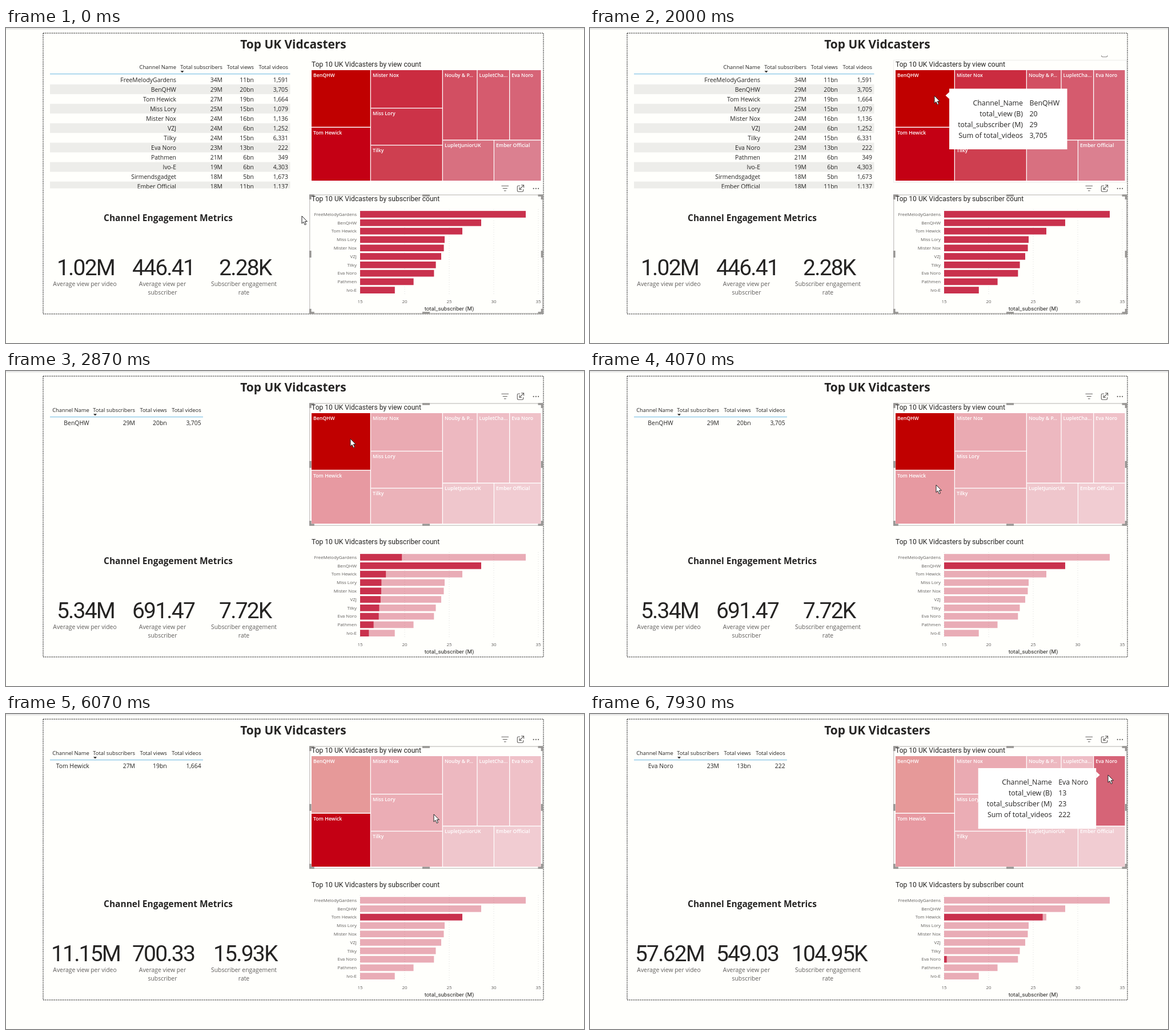
These frames come from a looping animation (1012 px wide and 553 px high, 8 s). An HTML page:

```html
<!DOCTYPE html>
<html lang="en">
<head>
<meta charset="utf-8">
<title>Channel dashboard</title>
<style>
html, body { margin: 0; width: 100%; height: 100%; overflow: hidden; background: #fffffc; }
svg { display: block; width: 100vw; height: 100vh; }
text { font-family: "Open Sans", "Noto Sans", sans-serif; fill: #252423; }
.din { font-family: Roboto, sans-serif; }
.r { text-anchor: end; }
.c { text-anchor: middle; }
.bold { font-weight: 700; }
.gray { fill: #605e5c; }
.cell { font-size: 10.4px; }
.head { font-size: 9.35px; }
.small { font-size: 7.95px; }
.tile { font-size: 8.7px; font-weight: 600; fill: #fff; }
.title { font-size: 12.1px; }
.card { font-size: 39px; letter-spacing: -1.8px; }
.tip { font-size: 12.35px; }
</style>
</head>
<body>
<svg id="stage" viewBox="0 0 1012 553" xmlns="http://www.w3.org/2000/svg">
<defs>
<linearGradient id="shade" x2="0" y2="1"><stop stop-color="#dedede"/><stop offset="1" stop-color="#fffffc"/></linearGradient>
<clipPath id="tableClip"><rect x="70" y="50" width="432" height="231.5"/></clipPath>
</defs>
</svg>
<script>
const LOOP = 8000;
const NS = "http://www.w3.org/2000/svg";
const stage = document.getElementById("stage");

function add(parent, tag, attrs) {
  const node = document.createElementNS(NS, tag);
  for (const k in attrs) node.setAttribute(k, attrs[k]);
  parent.appendChild(node);
  return node;
}
const group = (parent, attrs) => add(parent, "g", attrs);
const box = (parent, x, y, width, height, fill) => add(parent, "rect", { x, y, width, height, fill });
const stroke = (parent, d, color, width) =>
  add(parent, "path", { d, fill: "none", stroke: color, "stroke-width": width });
function label(parent, x, y, str, cls) {
  const node = add(parent, "text", { x, y, class: cls });
  node.textContent = str;
  return node;
}
const show = (node, on) => node.setAttribute("visibility", on ? "visible" : "hidden");
const clamp = v => Math.max(0, Math.min(1, v));
const cubic = p => p < .5 ? 4 * p ** 3 : 1 - 4 * (1 - p) ** 3;
const smooth = p => p * p * (3 - 2 * p);

const channels = [
  ["FreeMelodyGardens", "34M", "11bn", "1,591"],
  ["BenQHW", "29M", "20bn", "3,705"],
  ["Tom Hewick", "27M", "19bn", "1,664"],
  ["Miss Lory", "25M", "15bn", "1,079"],
  ["Mister Nox", "24M", "16bn", "1,136"],
  ["VZJ", "24M", "6bn", "1,252"],
  ["Tilky", "24M", "15bn", "6,331"],
  ["Eva Noro", "23M", "13bn", "222"],
  ["Pathmen", "21M", "6bn", "349"],
  ["Ivo-E", "19M", "6bn", "4,303"],
  ["Sirmendsgadget", "18M", "5bn", "1,673"],
  ["Ember Official", "18M", "11bn", "1,137"]
];
const barEnds = [910, 832, 799, 768, 766.5, 762, 752.5, 749.3, 713.5, 680.7];
const tiles = [
  ["BenQHW", 535, 74, 102.7, 99.5, "#c00000"],
  ["Tom Hewick", 535, 175, 102.7, 93, "#c40014"],
  ["Mister Nox", 639, 74, 124.7, 66, "#cb2c40"],
  ["Miss Lory", 639, 141.3, 124.7, 63.7, "#cc3348"],
  ["Tilky", 639, 206.3, 124.7, 61.7, "#ce3f50"],
  ["Nouby & P...", 765, 74, 59.3, 122, "#d24f62"],
  ["LupletCha...", 825.6, 74, 55.4, 122, "#d55b6e"],
  ["Eva Noro", 882.3, 74, 54.2, 122, "#d66477"],
  ["LupletJuniorUK", 765, 197.4, 88.8, 70.6, "#d87080"],
  ["Ember Official", 855, 197.4, 81.5, 70.6, "#db8090"]
];

// Each selection: channel row, tile, and the times at which the parts respond.
const picks = [
  { row: 1, tile: 0, map: 2415, bars: 2570, cards: 2730, table: 2800, values: ["5.34M", "691.47", "7.72K"] },
  { row: 2, tile: 1, map: 4850, bars: 5011, cards: 5130, table: 5260, values: ["11.15M", "700.33", "15.93K"] },
  { row: 7, tile: 7, map: 7720, bars: 7827, cards: 7870, table: 7870, values: ["57.62M", "549.03", "104.95K"] }
];
const lastPick = (t, part) => picks.filter(p => t >= p[part]).pop();

// Blend from state to state; pick null means nothing is selected.
function blend(t, part, span, ease, value) {
  let v = value(null);
  for (const p of picks) v += (value(p) - v) * ease(clamp((t - p[part]) / span));
  return v;
}

box(stage, 0, 0, 1012, 553, "#fffffc");
box(stage, 0, 0, 1012, 4, "url(#shade)");
add(stage, "rect", { x: 65, y: 9, width: 876, height: 493, fill: "none", stroke: "#3a3a3a", "stroke-width": 1.5, "stroke-dasharray": "1.6 1.6" });
label(stage, 503, 36, "Top UK Vidcasters", "bold c").style.fontSize = "20.9px";
label(stage, 284, 339, "Channel Engagement Metrics", "bold c").style.fontSize = "15.5px";

// Table
const heads = ["Channel Name", "Total subscribers", "Total views", "Total videos"];
function tableFrame(cols, end, arrowX) {
  const g = group(stage, { "clip-path": "url(#tableClip)" });
  heads.forEach((h, i) => label(g, cols[i], 72, h, "head r"));
  add(g, "path", { d: `M${arrowX - 3} 75.3h6l-3 3.2z`, fill: "#252423" });
  return g;
}
const blueLine = (g, end) => stroke(g, `M77 80.6H${end}`, "#84c4e6", 1.2);
const wide = [298, 379, 434, 494], tight = [145.7, 226, 281.7, 341.7];
const fullTable = tableFrame(wide, 497, 308.5);
channels.forEach((row, i) => {
  const y = 82 + 17.05 * i;
  if (i % 2) box(fullTable, 77, y, 420.5, 17.05, "#ededea");
  row.forEach((s, k) => label(fullTable, wide[k], y + 12.6, s, "cell r"));
});
blueLine(fullTable, 497.5);
add(fullTable, "rect", { x: 506.3, y: 60.5, width: 5, height: 24.5, rx: 1.5, fill: "#b3b1ae" });
const oneTable = tableFrame(tight, 345, 156);
blueLine(oneTable, 345);
const oneRow = tight.map(x => label(oneTable, x, 94.6, "", "cell r"));

// Cards
const cards = [139.5, 275.5, 418.8].map(x => label(stage, x, 433.5, "", "din card c"));
[[138, "Average view per video"], [274, "Average view per", "subscriber"], [416.5, "Subscriber engagement", "rate"]]
  .forEach(([x, ...lines]) => lines.forEach((s, i) => {
    label(stage, x, 453.3 + 15 * i, s, "gray c").style.fontSize = "10.4px";
  }));

// Bar chart
for (let i = 0; i < 5; i++) {
  const x = 620 + 78 * i;
  add(stage, "path", { d: `M${x} 318V470`, stroke: "#dcdcda", "stroke-dasharray": "1 3" });
  label(stage, x, 482.5, 15 + 5 * i, "small gray c");
}
label(stage, 776, 496, "total_subscriber (M)", "din c").style.fontSize = "9.7px";
const bars = barEnds.map((end, i) => {
  const y = 321.2 + 14.8 * i;
  label(stage, 614, y + 8.5, channels[i][0], "small gray r");
  box(stage, 620, y, end - 620, 11.6, "#c9314d").setAttribute("opacity", .4);
  return box(stage, 620, y, end - 620, 11.6, "#c9314d");
});

// Treemap
const hover = group(stage);
add(hover, "rect", { x: 531.5, y: 56.5, width: 408, height: 214.5, fill: "none", stroke: "#ececea" });
stroke(hover, "M895.5 48.3q0 2.4 2.2 2.4h6q2.2 0 2.2-2.4", "#8a8886", 1.1);
box(stage, 534, 73, 403.5, 196, "#fff");
const tileRects = tiles.map(([, x, y, w, h, fill]) => box(stage, x, y, w, h, fill));
tiles.forEach(([name, x, y]) => label(stage, x + 3, y + 12, name, "tile"));

// Selection frame with handles and header icons
function frame(top, bottom, iconY) {
  const g = group(stage), l = 531.8, r = 939.5, mid = (top + bottom) / 2;
  add(g, "rect", { x: l, y: top, width: r - l, height: bottom - top, fill: "none", stroke: "#b4b2b0" });
  const a = l + 1, b = r - 1, c = top + 1, d = bottom - 1;
  stroke(g, `M${a} ${c + 7}V${c}H${a + 7}M${b - 7} ${c}H${b}V${c + 7}M${b} ${d - 7}V${d}H${b - 7}M${a + 7} ${d}H${a}V${d - 7}` +
    `M729 ${c}h13M729 ${d}h13M${a} ${mid - 6}v12M${b} ${mid - 6}v12`, "#989694", 3.6);
  const i = group(g, { transform: `translate(0 ${iconY})` });
  stroke(i, "M867.5 -4.3h12.5M869.7 0h8M872 4.3h3.6", "#605e5c", 1.1);
  stroke(i, "M900 -4.5h-3q-1.7 0-1.7 1.7v6.8q0 1.7 1.7 1.7h7q1.7 0 1.7-1.7v-2.5M902 -5.7h4.6v4.6M906.3 -5.4L900 1M899 -2v4h4", "#605e5c", 1.1);
  for (let k = 0; k < 3; k++) add(i, "circle", { cx: 923.7 + 4.2 * k, cy: .3, r: 1.15, fill: "#605e5c" });
  return g;
}
const barFrame = frame(293, 501, 281.5);
const mapFrame = frame(57, 271, 44.5);
label(stage, 535, 68, "Top 10 UK Vidcasters by view count", "din title");
label(stage, 535, 304, "Top 10 UK Vidcasters by subscriber count", "din title");

// Tooltips
const tipNames = ["Channel_Name", "total_view (B)", "total_subscriber (M)", "Sum of total_videos"];
function tooltip(x, y, w, row, from, to, flip) {
  const node = group(stage, { transform: `translate(${x} ${y})` });
  box(node, 0, 0, w, 106.5, "#fff");
  add(node, "path", { d: flip ? `M${w} 6l6.5 6-6.5 6z` : "M0 6l-6.5 6 6.5 6z", fill: "#fff" });
  const [name, subs, views, videos] = channels[row];
  [name, parseInt(views), parseInt(subs), videos].forEach((v, i) => {
    label(node, 129, 29.3 + 19 * i, tipNames[i], "tip r");
    label(node, 140.5, 29.3 + 19 * i, v, "tip");
  });
  return { node, from, to };
}
const tips = [
  tooltip(629, 106.5, 206.5, 1, 1900, 2850),
  tooltip(633, 187, 225, 2, 4430, 5480),
  tooltip(679.7, 95, 206.5, 7, 7760, LOOP, true)
];

// Pointer: start, end, curve control point, goal
const moves = [
  [70, 870, 560, 470, 600, 400],
  [930, 1270, 610, 220, 579, 93],
  [1400, 1730, 590, 108, 603, 119],
  [3670, 4040, 732, 165, 606, 200],
  [5400, 6050, 680, 215, 749, 176],
  [6130, 6930, 800, 170, 865, 122],
  [7000, 7400, 890, 112, 907, 107]
];
const pointer = add(stage, "path", {
  d: "M0 0V13.2L3 10.5L5.2 15.6L7.5 14.6L5.3 9.7H9.4Z",
  fill: "#fff", stroke: "#222", "stroke-width": 1, "stroke-linejoin": "round"
});
function pointerAt(t) {
  let x = 518, y = 330;
  for (const [a, b, cx, cy, gx, gy] of moves) {
    if (t < a) break;
    const p = smooth(clamp((t - a) / (b - a))), q = 1 - p;
    x = q * q * x + 2 * q * p * cx + p * p * gx;
    y = q * q * y + 2 * q * p * cy + p * p * gy;
  }
  return [x, y];
}

function draw(t) {
  const rowPick = lastPick(t, "table"), cardPick = lastPick(t, "cards");
  show(fullTable, !rowPick);
  show(oneTable, rowPick);
  if (rowPick) oneRow.forEach((n, i) => n.textContent = channels[rowPick.row][i]);
  const values = cardPick ? cardPick.values : ["1.02M", "446.41", "2.28K"];
  cards.forEach((n, i) => n.textContent = values[i]);

  tileRects.forEach((n, i) =>
    n.setAttribute("opacity", blend(t, "map", 200, p => p, p => !p || p.tile === i ? 1 : .4)));
  bars.forEach((n, i) =>
    n.setAttribute("width", (barEnds[i] - 620) * blend(t, "bars", 500, cubic, p => +(!p || p.row === i))));

  show(hover, t >= 930 && t < 2270);
  show(barFrame, t < 2270);
  show(mapFrame, t >= 2270);
  tips.forEach(({ node, from, to }) => show(node, t >= from && t < to));
  pointer.setAttribute("transform", `translate(${pointerAt(t)})`);
}

const begin = performance.now();
function tick() {
  draw((performance.now() - begin) % LOOP);
  requestAnimationFrame(tick);
}
draw(0);
requestAnimationFrame(tick);
</script>
</body>
</html>
```
